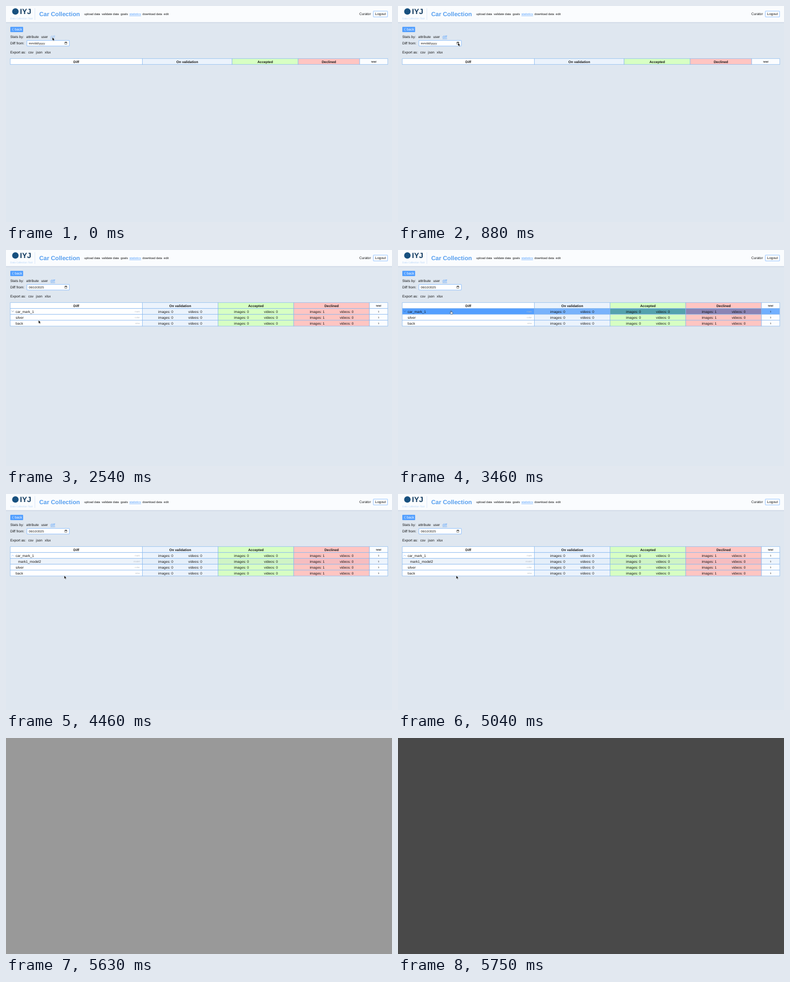
An HTML page for the animation above (5790 ms loop, 720x405 px).

```html
<!DOCTYPE html>
<html lang="en">
<head>
<meta charset="utf-8">
<title>Car Collection</title>
<style>
  html, body { margin: 0; width: 100%; height: 100%; overflow: hidden; background: #dfe7f0; }
  svg { display: block; width: 100vw; height: 100vh; }
  text { font-family: "Liberation Sans", Arial, sans-serif; text-rendering: geometricPrecision; white-space: pre; }
</style>
</head>
<body>
<svg id="stage" viewBox="0 0 720 405"></svg>
<script>
const LOOP = 5790, STEP = 1000 / 24;
const OPEN_AT = 1250, PICK_AT = 2500, EXPAND_AT = 3620, FADE_AT = 5460;
const BLUE = '#54a0ff', LINE = '#86b7ef', INK = '#141414';
const CELL = ['#ffffff', '#ebf3fc', '#d7ffc3', '#ffc5c2', '#fbfdff'];
const HOVER = ['#549fff', '#78b2fb', '#55a2ad', '#8b84b4', '#70afff'];
const CHILD = ['#edf3fa', '#e4eef9', '#cff4c5', '#f6bdc0', '#edf4fc'];
const stage = document.getElementById('stage');

function add(parent, tag, attrs = {}, content) {
  const node = document.createElementNS('http://www.w3.org/2000/svg', tag);
  for (const key in attrs) node.setAttribute(key, attrs[key]);
  if (content !== undefined) node.textContent = content;
  parent.appendChild(node);
  return node;
}
const group = (parent = stage) => add(parent, 'g');
const box = (parent, x, y, width, height, fill, more) =>
  add(parent, 'rect', { x, y, width, height, fill, ...more });
const path = (parent, d, stroke, width = 0.6, fill = 'none') =>
  add(parent, 'path', { d, stroke, 'stroke-width': width, fill });
const label = (parent, x, y, text, size = 6.48, more) =>
  add(parent, 'text', { x, y, 'font-size': size, fill: INK, ...more }, text);
const centered = (parent, x, y, text, size, more) =>
  label(parent, x, y, text, size, { 'text-anchor': 'middle', ...more });
const show = (node, on) => node.setAttribute('display', on ? 'inline' : 'none');
const BOLD = { 'font-weight': 700 };

function drawHeader() {
  const g = group();
  for (let i = 0; i < 3; i++) box(g, 0, 30 + i * 0.7, 720, 0.8, '#8fa3ba', { opacity: 0.28 - i * 0.09 });
  box(g, 0, 0, 720, 30.3, '#fafcfe');
  add(g, 'circle', { cx: 17.5, cy: 10.3, r: 6, fill: '#17507f' });
  label(g, 26, 15.3, 'IYJ', 14, { ...BOLD, fill: '#123b60' });
  label(g, 8, 24.8, 'Data Collection Tool', 4.7, { fill: '#b4d3f7' });
  box(g, 53.6, 4, 0.6, 22, '#c9ddf4');
  label(g, 62, 18.8, 'Car Collection', 11.2, { ...BOLD, fill: '#579fef' });
  [[146, 'upload data'], [178.5, 'validate data'], [213.8, 'goals'], [230.2, 'statistics'],
   [254.5, 'download data'], [294.3, 'edit']].forEach(([x, text]) =>
    label(g, x, 17.4, text, 5.65, text === 'statistics' ? { fill: BLUE, 'text-decoration': 'underline' } : {}));
  label(g, 659, 17.4, 'Curator');
  box(g, 685.2, 9.6, 26.5, 10.9, '#fff', { stroke: BLUE, 'stroke-width': 0.6, rx: 0.6 });
  centered(g, 698.5, 17.4, 'Logout');
}

function drawControls() {
  const g = group();
  box(g, 8, 39, 24, 9.9, BLUE, { rx: 1.2 });
  path(g, 'M13.6 41.3L11.8 44L13.6 46.7', '#fff', 0.6);
  label(g, 16.3, 46.3, 'back', 6.48, { fill: '#fff' });
  [[8, 60, 'Stats by:'], [37.8, 60, 'attribute'], [65.7, 60, 'user'], [8, 71.9, 'Diff from:'],
   [8, 89.4, 'Export as:'], [41.5, 89.4, 'csv'], [56, 89.4, 'json'], [72.3, 89.4, 'xlsx']]
    .forEach(([x, y, text]) => label(g, x, y, text));
  const link = label(g, 83, 60, 'diff', 6.48, { fill: BLUE, 'text-decoration': 'underline' });
  box(g, 39, 64.6, 79.2, 10.4, '#fff', { stroke: BLUE, 'stroke-width': 0.6, rx: 0.6 });
  const date = label(g, 42.6, 71.9, '', 5.6);
  box(g, 109.9, 68, 3.7, 3.8, 'none', { stroke: INK, 'stroke-width': 0.5 });
  box(g, 109.8, 67.6, 3.9, 1.2, INK);
  return { link, date };
}

function drawCell(g, left, right, top, height, fill) {
  box(g, left, top, right - left, height, fill, { stroke: LINE, 'stroke-width': 0.7 });
}

function drawTableHead(edges) {
  const g = group();
  ['Diff', 'On validation', 'Accepted', 'Declined', 'total'].forEach((title, i) => {
    drawCell(g, edges[i], edges[i + 1], 98.7, 11, CELL[i]);
    centered(g, (edges[i] + edges[i + 1]) / 2, i < 4 ? 106.5 : 105.7, title, i < 4 ? 6.45 : 4.5, BOLD);
  });
  return g;
}

function drawRow(parent, edges, index, name, tag, fills, indent = 18) {
  const g = group(parent), top = 109.8 + index * 11, base = top + 7.8;
  fills.forEach((fill, i) => {
    drawCell(g, edges[i], edges[i + 1], top, 11, fill);
    if (i < 1 || i > 3) return;
    const middle = (edges[i] + edges[i + 1]) / 2;
    centered(g, middle - 27, base, `images: ${i === 3 ? 1 : 0}`);
    centered(g, middle + 28, base, 'videos: 0');
  });
  label(g, indent, base, name);
  label(g, 249.7, base - 1.1, tag, 4.3, { fill: '#b3bbc5', 'text-anchor': 'end' });
  centered(g, 695, base - 0.6, '1', 4.5);
  return g;
}

function drawMarkRow(edges, fills, expanded) {
  const g = drawRow(stage, edges, 0, 'car_mark_1', 'mark', fills);
  path(g, expanded ? 'M10.3 116.7L12.5 114.7L14.7 116.7' : 'M10.3 113.8L12.5 115.8L14.7 113.8',
    expanded ? BLUE : '#234a7a', 0.5);
  return g;
}

function drawCalendar() {
  const g = group();
  for (let i = 5; i > 0; i--)
    box(g, 39 - i * 0.7, 76.5 - i * 0.4, 87 + i * 1.4, 110.5 + i * 1.2, '#304050', { opacity: 0.055, rx: 2 + i * 0.5 });
  box(g, 39, 75.7, 87, 111.3, '#fff', { rx: 1.2, stroke: '#a9b2bc', 'stroke-width': 0.4 });
  label(g, 43, 86.4, 'June 2025', 4.95, BOLD);
  path(g, 'M68 83.6h3l-1.5 1.8z', 'none', 0, INK);
  path(g, 'M103 88V81.4M100.2 84.2L103 81.4L105.8 84.2M116 81.4V88M113.2 85.2L116 88L118.8 85.2', '#333', 0.65);
  const columnX = i => 48.7 + 11.2 * i;
  [...'MTWTFSS'].forEach((day, i) => centered(g, columnX(i), 100.9, day, 5.2));
  box(g, 54.3, 127.6, 11.2, 10.8, '#0b5fd8', { rx: 0.6 });
  for (let i = 0; i < 42; i++) {
    const date = new Date(2025, 4, 26 + i), day = date.getDate(), current = date.getMonth() === 5;
    const chosen = current && day === 10;
    centered(g, columnX(i % 7), 112.5 + 11.18 * Math.floor(i / 7), day, 5.2,
      { fill: chosen ? '#fff' : current ? INK : '#757575', 'font-weight': chosen ? 700 : 400 });
  }
  label(g, 47.4, 181.1, 'Clear', 5.2, { fill: '#1a6fdf' });
  label(g, 104.2, 181.1, 'Today', 5.2, { fill: '#1a6fdf' });
  return g;
}

box(stage, 0, 0, 720, 405, '#dfe7f0');
drawHeader();
const { link, date } = drawControls();
const filledEdges = [8, 254.3, 395.6, 536.8, 678, 712];
const emptyHead = drawTableHead([8, 254.3, 421.8, 545, 659.8, 712]);
const filledHead = drawTableHead(filledEdges);
const markRow = drawMarkRow(filledEdges, CELL, false);
const markHover = drawMarkRow(filledEdges, HOVER, false);
const markOpen = drawMarkRow(filledEdges, CELL, true);
const markOpenHover = drawMarkRow(filledEdges, HOVER, true);
const modelRow = drawRow(stage, filledEdges, 1, 'mark1_model2', 'model', CHILD, 22.6);
const lowerRows = group();
drawRow(lowerRows, filledEdges, 1, 'silver', 'color', CELL);
drawRow(lowerRows, filledEdges, 2, 'back', 'view', CELL);
const calendar = drawCalendar();

const cursor = group();
const arrow = path(cursor, 'M0 0V6L1.4 4.8L2.4 7L3.4 6.5L2.4 4.4H4.2Z', '#fff', 0.4, '#000');
const hand = path(cursor, 'M-.6 .5Q0 -.5 .6 .5V2.6L2.9 3.3Q3.4 3.6 3.2 4.4L2.6 6.5H-.6L-2.3 4Q-2 3 -.6 4Z', '#111', 0.5, '#fff');
const fade = box(stage, 0, 0, 720, 405, '#e4e4e4');

// time, x, y of the pointer tip
const route = [[0, 86.5, 58.8], [120, 86.5, 58.8], [560, 112, 69], [1270, 112, 69], [1660, 136.8, 152.3],
  [1850, 136.8, 152.3], [2260, 60, 132], [2510, 60, 132], [2900, 99, 113.6], [3720, 99, 113.6], [4300, 108.7, 153]];

function pointerAt(t) {
  const next = route.findIndex(stop => stop[0] > t);
  if (next < 0) return route[route.length - 1].slice(1);
  const [t0, x0, y0] = route[next - 1], [t1, x1, y1] = route[next];
  const u = (t - t0) / (t1 - t0), eased = u * u * (3 - 2 * u);
  return [x0 + (x1 - x0) * eased, y0 + (y1 - y0) * eased];
}

function fadeLevel(t) {
  const held = t < 5540 ? 0 : t < 5625 ? 80 : t - FADE_AT;
  return Math.round(228 - 0.352 * held - 0.00063 * held * held);
}

function render(time) {
  const t = Math.floor((time % LOOP + 5) / STEP) * STEP;
  const picked = t >= PICK_AT, expanded = t >= EXPAND_AT;
  const [x, y] = pointerAt(t);
  const overMark = picked && y > 109.8 && y < 120.8;

  link.setAttribute('opacity', x > 82 && x < 92 && y < 61 ? 0.6 : 1);
  date.textContent = picked ? '06/10/2025' : 'mm/dd/yyyy';
  show(calendar, t >= OPEN_AT && !picked);
  show(emptyHead, !picked);
  show(filledHead, picked);
  show(markRow, picked && !expanded && !overMark);
  show(markHover, overMark && !expanded);
  show(markOpen, expanded && !overMark);
  show(markOpenHover, expanded && overMark);
  show(modelRow, expanded);
  show(lowerRows, picked);
  lowerRows.setAttribute('transform', `translate(0 ${expanded ? 11 : 0})`);

  cursor.setAttribute('transform', `translate(${x} ${y})`);
  show(arrow, !overMark);
  show(hand, overMark);

  const fading = t >= FADE_AT - 5;
  show(fade, fading);
  if (fading) {
    const level = fadeLevel(t);
    fade.setAttribute('fill', `rgb(${level},${level},${level})`);
  }
}

const start = performance.now();
function tick() {
  render(performance.now() - start);
  requestAnimationFrame(tick);
}
tick();
</script>
</body>
</html>
```
